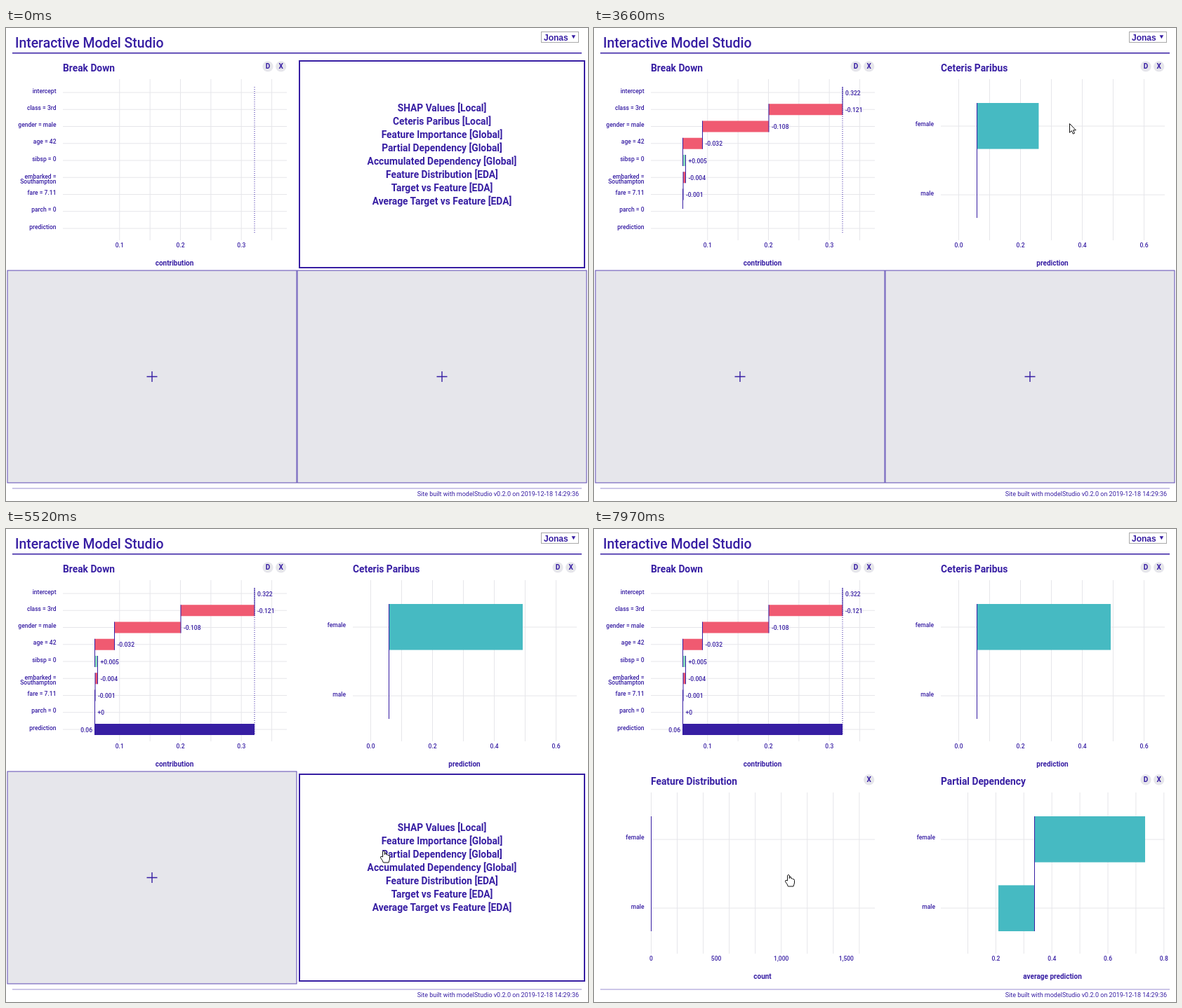
Animation of 829 by 675 pixels, one loop 8 s. Source, as an HTML page:

```html
<!DOCTYPE html>
<html lang="en">
<head>
<meta charset="utf-8">
<title>Interactive Model Studio</title>
<style>
  html, body { margin: 0; width: 100%; height: 100%; overflow: hidden; background: #fff; }
  svg { display: block; font-family: Roboto, "Open Sans", sans-serif; fill: #371ea3; }
  .heading { font-size: 19.4px; font-weight: 500; }
  .title, .menu text { font-size: 13.8px; font-weight: 600; }
  .label { font-size: 8.5px; font-weight: 500; }
  .axis { font-size: 10px; font-weight: 600; }
  .footer { font-size: 9px; }
  .select { font: bold 12px "Liberation Sans", Arial, sans-serif; }
  .mid { text-anchor: middle; }
  .end { text-anchor: end; }
  .grid { stroke: #e6e6ea; fill: none; }
  .line { stroke: #371ea3; fill: none; }
  .menu rect { fill: #fff; stroke: #371ea3; stroke-width: 2; }
  .empty rect { fill: #e6e6eb; stroke: #371ea3; stroke-opacity: .8; }
  .empty.hover rect { fill: #cecdd8; stroke-width: 2; stroke-opacity: 1; }
  .cursor path { fill: #fff; stroke: #111; stroke-linejoin: round; }
</style>
</head>
<body>
<svg id="stage" width="829" height="675" viewBox="0 0 829 675"></svg>
<script>
const LOOP = 8000, BAR_TIME = 495;
const RED = '#f05a71', GREEN = '#8bdcbe', TEAL = '#46bac2', DARK = '#371ea3';
const stage = document.getElementById('stage');
const get = id => document.getElementById(id);

const range = (n, fn) => Array.from({ length: n }, (_, i) => fn(i));
const clamp = v => Math.max(0, Math.min(1, v));
const cubic = p => p < .5 ? 4 * p ** 3 : 1 - 4 * (1 - p) ** 3;
const smooth = p => p * p * (3 - 2 * p);
const grow = (t, from, to) => cubic(clamp((t - from) / (to - from)));

const text = (x, y, str, cls, id = '') => `<text x="${x}" y="${y}" class="${cls}" ${id && `id="${id}"`}>${str}</text>`;
const path = (d, cls, extra = '') => `<path d="${d}" class="${cls}" ${extra}/>`;
const group = (id, x, y, body, cls = '') => `<g id="${id}" class="${cls}" transform="translate(${x} ${y})">${body}</g>`;
const bar = (id, y, h, color) => `<rect id="${id}" y="${y}" height="${h}" fill="${color}"/>`;

function frame({ title, axis, buttons, rows, columns, ticks }) {
  const button = (name, i) => {
    const x = 391.7 - 18.7 * (buttons.length - 1 - i);
    return `<circle cx="${x}" cy="54.8" r="7.6" fill="#e6e6eb"/>` + text(x, 58.4, name, 'axis mid');
  };
  return text(81, 62, title, 'title') + [...buttons].map(button).join('') +
    path(columns.map(x => `M${x} 73V303`).join('') + rows.map(y => `M81 ${y}H400`).join(''), 'grid') +
    ticks.map(([x, s]) => text(x, 313, s, 'label mid')).join('') +
    text(240, 338.5, axis, 'axis mid');
}

// Waterfall chart
const ROW = 24.25;
const rowY = i => 92 + ROW * i;
const ends = [354, 249, 154.5, 126.5, 130.5, 127, 126.5, 126.5, 126.5];
const starts = [-100, 400, 890, 1390, 1890, 2400, 2890, 3385, 3858, 4350];
const features = ['intercept', 'class = 3rd', 'gender = male', 'age = 42', 'sibsp = 0',
  'embarked =', 'fare = 7.11', 'parch = 0', 'prediction'];
const effects = ['0.322', '-0.121', '-0.108', '-0.032', '+0.005', '-0.004', '-0.001', '+0', '0.06'];
const origin = i => i === 8 ? ends[0] : ends[Math.max(0, i - 1)];

function waterfall() {
  const names = features.map((s, i) => text(71.5, rowY(i) + .6 + (i === 5 ? .8 : 0), s, 'label end')).join('') +
    text(71.5, 222, 'Southampton', 'label end');
  const bars = range(9, i => bar('step' + i, rowY(i) - 8, 16, i === 8 ? DARK : i === 4 ? GREEN : RED)).join('');
  const links = range(8, i => path('', 'line', `id="link${i}"`)).join('');
  const values = effects.map((s, i) => i === 8
    ? text(123, rowY(i) + 3.5, s, 'label end', 'value8')
    : text(Math.max(origin(i), ends[i]) + 4, rowY(i) + 3.5, s, 'label', 'value' + i)).join('');
  return frame({
    title: 'Break Down', axis: 'contribution', buttons: 'DX', rows: range(9, rowY),
    columns: range(6, i => 161.8 + 43.35 * i),
    ticks: range(3, i => [161.8 + 86.7 * i, '0.' + (i + 1)])
  }) + names + path('M354 84V294', 'line', 'stroke-dasharray="1 2"') + bars + links + values;
}

// Two-row bar charts
const charts = {
  ceteris: { at: 3420, x: 413, y: 0, base: 132.5, to: [323, 132.5], labelX: 71,
    title: 'Ceteris Paribus', axis: 'prediction', buttons: 'DX',
    columns: range(7, i => 106.5 + 44 * i),
    ticks: range(4, i => [106.5 + 88 * i, (i * .2).toFixed(1)]) },
  partial: { at: 5690, x: 413, y: 303, base: 214.5, to: [372, 163], labelX: 73,
    title: 'Partial Dependency', axis: 'average prediction', buttons: 'DX',
    columns: range(8, i => 119.5 + 39.9 * i),
    ticks: range(4, i => [159.4 + 79.8 * i, (i * .2 + .2).toFixed(1)]) },
  counts: { at: 7930, x: 0, y: 303, base: 81.5, to: [168, 378], labelX: 71.5,
    title: 'Feature Distribution', axis: 'count', buttons: 'X',
    columns: range(9, i => 81.5 + 37.05 * i),
    ticks: range(4, i => [81.5 + 92.6 * i, (i * 500).toLocaleString('en-US')]) }
};

const barChart = (id, c) => group(id, c.x, c.y, frame({ ...c, rows: [140, 238] }) +
  ['female', 'male'].map((s, i) => text(c.labelX, 140.3 + 98.4 * i, s, 'label end') +
    bar(id + i, 107 + 98.4 * i, 65.6, TEAL)).join('') +
  path(`M${c.base} 107V271`, 'line'));

// Menus and empty panels
const options = ['SHAP Values [Local]', 'Ceteris Paribus [Local]', 'Feature Importance [Global]',
  'Partial Dependency [Global]', 'Accumulated Dependency [Global]', 'Feature Distribution [EDA]',
  'Target vs Feature [EDA]', 'Average Target vs Feature [EDA]'];

function menu(id, x, y, used = []) {
  const items = options.filter(s => !used.some(u => s.startsWith(u)));
  return group(id, x, y, '<rect x="5" y="47" width="406" height="295"/>' +
    items.map((s, i) => text(208, 185.3 + 19 * (i - (items.length - 1) / 2), s, 'mid')).join(''), 'menu');
}

const empty = (id, x) => group(id, x, 303, '<rect x="2" y="43" width="412" height="303"/>' +
  path('M200.5 194.5H215.5M208 187V202', 'line', 'stroke-width="1.4"'), 'empty');

stage.innerHTML =
  text(13, 27.8, 'Interactive Model Studio', 'heading') +
  path('M9 35.7H820', 'line', 'stroke-width="1.4"') +
  '<rect x="762.5" y="5.5" width="53" height="15" fill="#fff" stroke="#a9a9a9"/>' +
  text(766, 17.6, 'Jonas', 'select') + path('M805.6 10.3h5.6l-2.8 5z', '') +
  path('M9 657H820', 'line', 'stroke-opacity=".5"') +
  text(816, 668, 'Site built with modelStudio v0.2.0 on 2019-12-18 14:29:36', 'footer end') +
  group('waterfall', 0, 0, waterfall()) +
  Object.entries(charts).map(([id, c]) => barChart(id, c)).join('') +
  empty('emptyLeft', 0) + empty('emptyRight', 413) +
  menu('menuTop', 413, 0, ['Break Down']) +
  menu('menuRight', 413, 303, ['Ceteris']) +
  menu('menuLeft', 0, 303, ['Ceteris', 'Partial']) +
  group('cursor', 0, 0,
    path('M.5.5V13.3L3.4 10.6 5.4 15.1 7.5 14.2 5.6 9.8H9.4Z', '', 'id="arrow"') +
    path('M-1.4 9V1.4Q0-.6 1.4 1.4V5.6Q3-.0 4.1 6Q5.6 5 6.4 6.8Q8.4 6 8.5 8.4V12Q8 14 7 17H-.6Q-1.4 14-4.4 10.4Q-4.9 8-2.8 8.3Z', '', 'id="hand"'),
    'cursor');

// Pointer track: time, x, y
const track = [
  [70, 819, 23], [100, 818, 23], [430, 818, 23], [1100, 796, 30], [2080, 796, 30], [2390, 782, 63],
  [2860, 774, 74], [3350, 677, 136], [3700, 677, 136], [4130, 716, 370], [4400, 713, 382],
  [4650, 713, 382], [5380, 538, 459], [5700, 538, 459], [6250, 383, 422], [6400, 374, 427],
  [6850, 374, 427], [7650, 277, 493], [LOOP, 277, 493]
];
const handTimes = [[3270, 3450], [5000, 5700], [7310, LOOP]];

function pointer(t) {
  const i = Math.max(1, track.findIndex(k => k[0] > t));
  const [t0, x0, y0] = track[i - 1], [t1, x1, y1] = track[i];
  const p = smooth(clamp((t - t0) / (t1 - t0)));
  return [x0 + (x1 - x0) * p, y0 + (y1 - y0) * p];
}

const show = (id, on) => { get(id).style.display = on ? '' : 'none'; };

function setBar(id, from, to, p) {
  const x = from + (to - from) * p;
  get(id).setAttribute('x', Math.min(from, x));
  get(id).setAttribute('width', Math.abs(x - from));
}

function render(t) {
  for (let i = 0; i < 9; i++) {
    setBar('step' + i, origin(i), ends[i], grow(t, starts[i], starts[i + 1]));
    show('value' + i, t >= starts[i + 1]);
    if (i === 8) continue;
    const length = (ROW + 16) * grow(t, starts[i + 1], starts[i + 2]);
    get('link' + i).setAttribute('d', `M${ends[i]} ${rowY(i) - 8}v${length}`);
  }
  for (const [id, c] of Object.entries(charts)) {
    show(id, t >= c.at);
    c.to.forEach((x, i) => {
      const start = c.at + i * BAR_TIME;
      setBar(id + i, c.base, x, grow(t, start, start + BAR_TIME));
    });
  }
  show('menuTop', t < charts.ceteris.at);
  show('emptyRight', t < 4390);
  show('menuRight', t >= 4390 && t < charts.partial.at);
  show('emptyLeft', t < 6750);
  show('menuLeft', t >= 6750 && t < charts.counts.at);

  const [x, y] = pointer(t);
  const hand = handTimes.some(([a, b]) => t >= a && t < b);
  get('emptyRight').classList.toggle('hover', y > 345 && x > 414);
  get('emptyLeft').classList.toggle('hover', y > 345 && x < 414);
  get('cursor').setAttribute('transform', `translate(${Math.round(x)} ${Math.round(y)})`);
  show('cursor', t >= 70);
  show('arrow', !hand);
  show('hand', hand);
}

const begun = performance.now();
function tick() {
  render((performance.now() - begun) % LOOP);
  requestAnimationFrame(tick);
}
tick();
</script>
</body>
</html>
```
